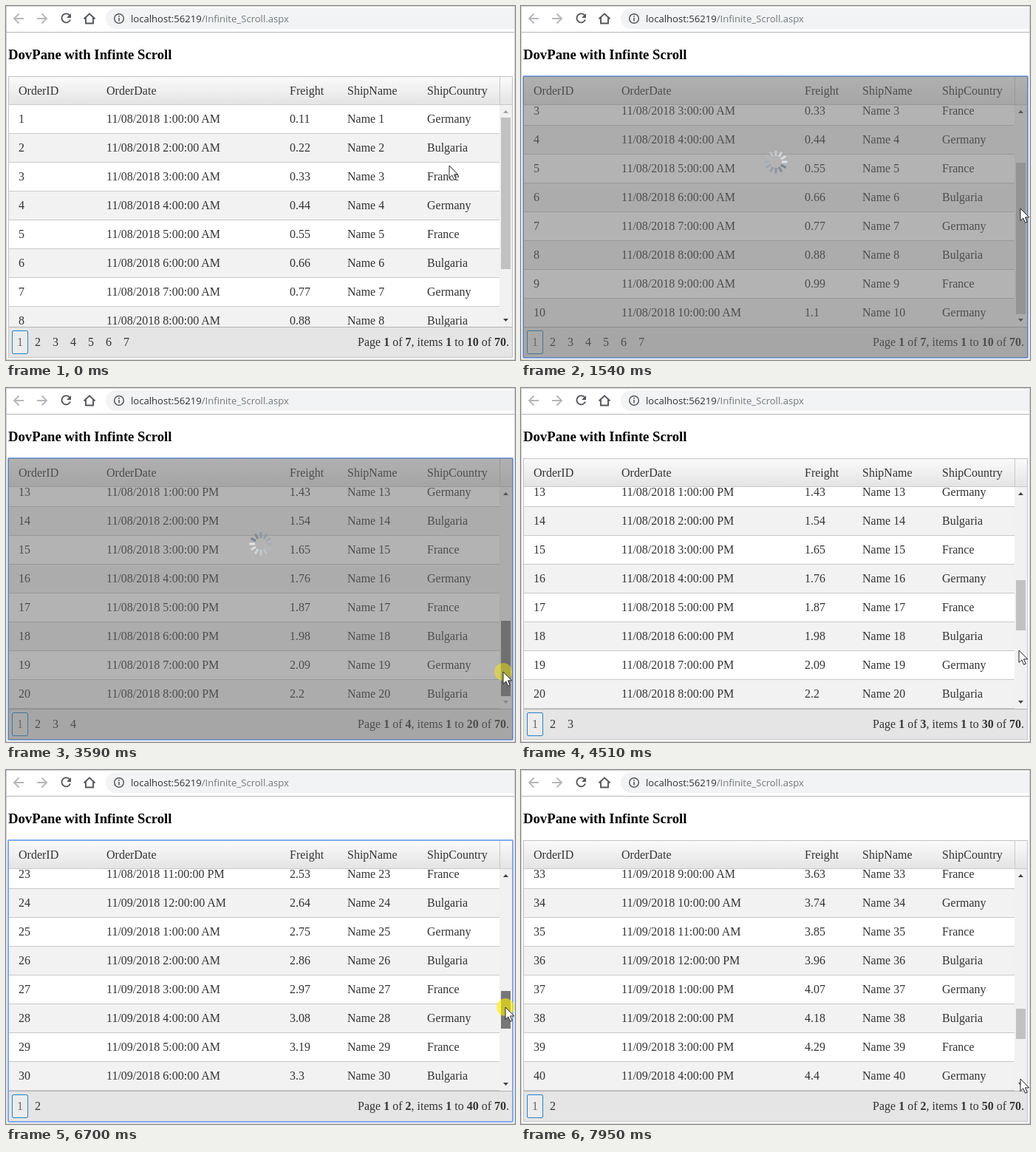
An HTML page that plays this animation: 689x479 px, repeating every 8000 ms.

```html
<!DOCTYPE html>
<html lang="en">
<head>
<meta charset="utf-8">
<title>Infinite scroll grid</title>
<style>
html, body { margin: 0; width: 100%; height: 100%; overflow: hidden; background: #fff; }
#stage { position: relative; width: 689px; height: 479px; overflow: hidden; background: #fff;
  font: 16px "Liberation Serif", "Times New Roman", serif; color: #333; }
#stage div, #stage svg, #stage span { position: absolute; box-sizing: border-box; white-space: pre; }
#frame { inset: 0; border: 1px solid #d2d2d2; }
#rule { left: 0; top: 35px; width: 689px; height: 1px; background: #b6b6b6; }
#address { left: 135px; top: 3px; width: 553px; height: 28px; border-radius: 14px 0 0 14px;
  background: #f1f3f4; font: 13.1px/28px "Open Sans", "Noto Sans", sans-serif; color: #75797d; padding-left: 34px; }
#address b { font-weight: 400; color: #303236; }
#title { left: 3px; top: 55px; font-size: 18.72px; line-height: 22px; font-weight: 700; color: #000; }
#grid { left: 3px; top: 95px; width: 683px; height: 381px; border: 1px solid #c2c2c2; }
#focus { left: 2px; top: 94px; width: 685px; height: 383px; border: 2px solid #80aaf0; border-radius: 2px; }
#head { left: 4px; top: 96px; width: 681px; height: 38px; line-height: 38px;
  background: linear-gradient(#fafafa, #e4e4e4); border-bottom: 1px solid #c9c9c9; }
#head i { position: absolute; left: 664px; top: 0; width: 1px; height: 37px; background: #c9c9c9; }
#view { left: 4px; top: 134px; width: 664px; height: 300px; overflow: hidden; }
#rows { left: 0; top: 0; width: 664px; }
.row { left: 0; width: 664px; height: 39px; line-height: 38px; border-bottom: 1px solid #c9c9c9; }
.row:nth-child(even) { background: #f2f2f2; }
#bar { left: 668px; top: 134px; width: 17px; height: 300px; background: #f1f1f1; }
#thumb { left: 2px; width: 13px; }
#bar svg { left: 0; top: 0; }
#foot { left: 4px; top: 434px; width: 681px; height: 41px; background: #e5e5e5; border-top: 1px solid #b2b2b2; }
#pager span { top: 439px; width: 22px; height: 32px; line-height: 32px; text-align: center; }
#pager span:first-child { border: 1px solid #2583c6; border-radius: 2px; line-height: 30px; color: #666; background: #ececec; }
#info { right: 8px; top: 439px; line-height: 32px; }
#shade { left: 3px; top: 95px; width: 683px; height: 381px; background: rgba(105, 105, 105, .5); }
#spin { left: 328px; top: 194px; }
#halo { left: -12px; top: -12px; width: 24px; height: 24px; border-radius: 50%; background: #fff000; }
#mouse { left: 0; top: 0; }
#mouse svg { left: -1px; top: -1px; }
</style>
</head>
<body>
<div id="stage">
  <svg width="180" height="36" fill="none" stroke-width="1.9" style="z-index:1">
    <g stroke="#b5b7ba">
      <path d="M24 17H11.5M17.5 10.5L11 17L17.5 23.5"/>
      <path d="M42 17H54.5M48.500 10.5L55 17L48.5 23.5"/>
    </g>
    <g stroke="#54575b">
      <path d="M86.2 12.8A6 6 0 1 0 87 18.500"/>
      <path d="M88 10V16H82Z" fill="#54575b" stroke="none"/>
      <path d="M105.500 17.500L113 10.500L120.500 17.500M108 16V23.500H118V16"/>
      <circle cx="153" cy="17" r="6.3" stroke-width="1.5"/>
      <path d="M153 16V20.500M153 13V14.700" stroke-width="1.6"/>
    </g>
  </svg>
  <div id="address"><b>localhost:56219</b>/Infinite_Scroll.aspx</div>
  <div id="rule"></div>
  <div id="title">DovPane with Infinte Scroll</div>
  <div id="grid"></div>
  <div id="head"><i></i></div>
  <div id="view"><div id="rows"></div></div>
  <div id="bar">
    <div id="thumb"></div>
    <svg width="17" height="300"><path id="up" d="M5 11H12L8.500 7Z"/><path id="down" d="M5 289H12L8.500 293Z"/></svg>
  </div>
  <div id="foot"></div>
  <div id="pager"></div>
  <div id="info"></div>
  <div id="focus"></div>
  <div id="shade"></div>
  <svg id="spin" width="34" height="34"></svg>
  <div id="frame"></div>
  <div id="mouse">
    <div id="halo"></div>
    <svg width="16" height="23"><path transform="translate(1 1)" d="M0 0V16.500L3.800 12.900L6.600 19.300L9.300 18.100L6.500 11.900H11.700Z" fill="#fff" stroke="#222"/></svg>
  </div>
</div>
<script>
const LOOP = 8000, ROW = 39, VIEW = 300, TRACK = 266;
const $ = id => document.getElementById(id);

// The screen refreshes only at these moments.
const ticks = [0, 150, 310, 460, 620, 780, 930, 1090, 1240, 1390, 1540, 1720,
  2020, 2180, 2330, 2490, 2640, 2790, 2950, 3100, 3260, 3410, 3590, 3740, 3890, 4040,
  4200, 4360, 4520, 4680, 4840, 5000, 5160, 5310, 5460, 5620, 5780, 5930, 6090, 6250,
  6400, 6550, 6700, 6850, 7000, 7160, 7310, 7460, 7620, 7780, 7950];

// Pointer path: time, x, y
const path = [[0, 600, 216], [150, 600, 216], [620, 676, 213], [780, 676, 213], [1240, 676, 274],
  [2020, 676, 274], [2490, 675, 225], [2790, 675, 225], [3410, 673, 384], [4200, 673, 384],
  [4680, 676, 295.5], [4840, 676, 295.5], [5310, 676, 363], [5460, 676, 388], [6090, 676, 388],
  [6550, 676, 321], [6700, 676, 321], [7310, 676, 418], [8000, 676, 418]];

// Each drag scrolls to the end and fetches ten more rows.
const drags = [
  { press: 780, load: 1240, up: 1240, done: 1720 },
  { press: 2490, load: 3410, up: 3590, done: 4200 },
  { press: 4680, load: 5620, up: 5780, done: 6090 },
  { press: 6550, load: 7310, up: 7460, done: 7950 }];

const cols = [17, 136, 384, 462, 570];
const lands = ["Germany", "Bulgaria", "France", "Germany", "France", "Bulgaria"];
const cells = list => list.map((s, i) => `<span style="left:${cols[i] - 4}px">${s}</span>`).join("");

function date(n) {
  const day = String(8 + Math.floor(n / 24)).padStart(2, "0"), h = n % 24;
  return `11/${day}/2018 ${h % 12 || 12}:00:00 ${h < 12 ? "AM" : "PM"}`;
}

$("head").innerHTML += cells(["OrderID", "OrderDate", "Freight", "ShipName", "ShipCountry"]);
$("rows").innerHTML = Array.from({ length: 50 }, (_, i) => {
  const n = i + 1;
  return `<div class="row" style="top:${i * ROW}px">` +
    cells([n, date(n), n * 11 / 100, "Name " + n, lands[i % 6]]) + "</div>";
}).join("");
$("spin").innerHTML = Array.from({ length: 12 }, (_, i) =>
  `<path d="M17 1.500V9" stroke="#fff" stroke-width="3" transform="rotate(${i * 30} 17 17)"/>`).join("");
const spokes = [...$("spin").children];

function pointer(t) {
  const i = path.findIndex(p => p[0] > t);
  const [t0, x0, y0] = path[i - 1], [t1, x1, y1] = path[i];
  const k = (t - t0) / (t1 - t0);
  return [x0 + (x1 - x0) * k, y0 + (y1 - y0) * k];
}

function scrollAt(t, done) {
  const d = drags[done];
  const full = (done + 1) * 10 * ROW, max = full - VIEW;
  const from = done ? done * 10 * ROW - VIEW : 0;
  if (!d || t < d.press) return from;
  const dy = pointer(Math.min(t, d.load))[1] - pointer(d.press)[1];
  return Math.max(from, Math.min(max, from + dy * full / TRACK));
}

let pages = 0;
function showPages(done) {
  if (pages === done + 1) return;
  pages = done + 1;
  const count = Math.ceil(7 / pages);
  $("pager").innerHTML = Array.from({ length: count }, (_, i) =>
    `<span style="left:${8 + i * 24}px">${i + 1}</span>`).join("");
  $("info").innerHTML =
    `Page <b>1</b> of <b>${count}</b>, items <b>1</b> to <b>${pages * 10}</b> of <b>70</b>.`;
}

function draw(t) {
  const done = drags.filter(d => t >= d.done).length, d = drags[done];
  const full = (done + 1) * 10 * ROW, pos = scrollAt(t, done);
  const [x, y] = pointer(t);
  const loading = !!d && t >= d.load;
  const focused = !!d && t >= d.press;
  const held = focused && t < d.up + 150;
  const size = TRACK * VIEW / full, top = 17 + pos * TRACK / full;
  const over = !loading && x > 669 && x < 684 && y > 134 + top && y < 134 + top + size;

  showPages(done);
  $("rows").style.top = -Math.round(pos) + "px";
  const thumb = $("thumb").style;
  thumb.top = Math.round(top) + "px";
  thumb.height = Math.round(size) + "px";
  thumb.background = held ? "#787878" : over ? "#a8a8a8" : "#c1c1c1";
  $("up").setAttribute("fill", pos > 0 ? "#404040" : "#a3a3a3");
  $("down").setAttribute("fill", pos < full - VIEW - .5 ? "#404040" : "#a3a3a3");

  $("focus").style.display = focused ? "" : "none";
  $("shade").style.display = $("spin").style.display = loading ? "" : "none";
  const lead = Math.floor((t - 1540) / 820 * 12) + 3;
  spokes.forEach((s, i) => {
    const age = (((lead - i) % 12) + 12) % 12;
    s.setAttribute("stroke", `hsl(210 8% ${90 - age * 3.6}%)`);
  });

  $("mouse").style.transform = `translate(${Math.round(x)}px, ${Math.round(y)}px)`;
  $("halo").style.opacity = !held ? 0 : t >= d.up ? .45 : .62;
}

let last = -1;
function tick() {
  const now = performance.now() % LOOP;
  const t = ticks.filter(s => s <= now).pop();
  if (t !== last) draw(last = t);
  requestAnimationFrame(tick);
}
tick();
</script>
</body>
</html>
```
